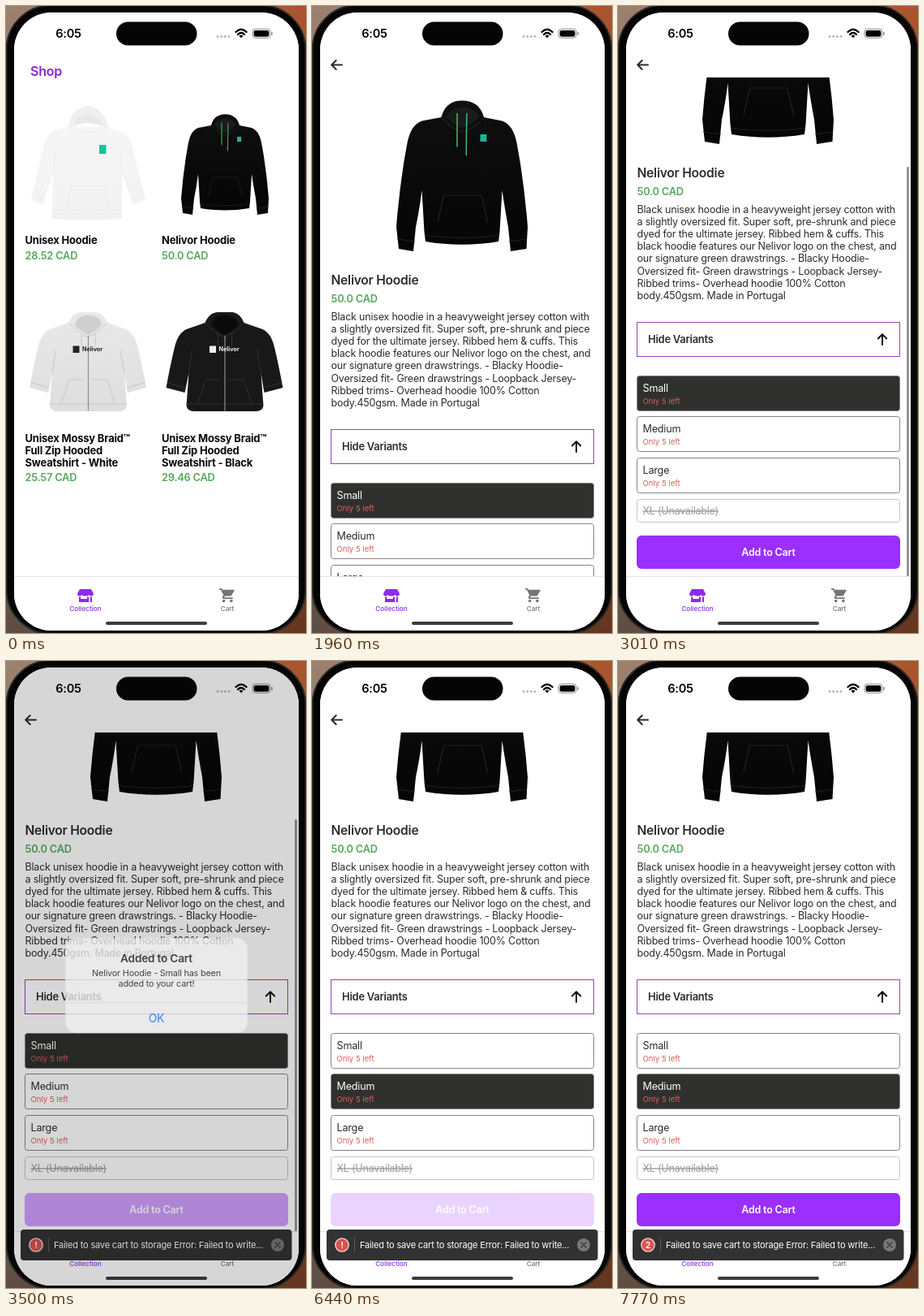
An HTML page for the animation above (8000 ms loop, 370 by 772 pixels).

```html
<!DOCTYPE html>
<html lang="en">
<head>
<meta charset="utf-8">
<title>Shop demo</title>
<style>
  html, body { margin: 0; width: 100%; height: 100%; overflow: hidden; background: #111; }
  svg { display: block; width: 370px; height: 772px; }
  text { font-family: Inter, "Liberation Sans", sans-serif; white-space: pre; }
</style>
</head>
<body>
<svg id="stage" viewBox="0 0 370 772" xmlns="http://www.w3.org/2000/svg"></svg>
<script>
const PURPLE = '#9a2fff', GREEN = '#55a85a', INK = '#2c2c2e';
const BRAND = 'Nelivor';
const LOOP = 8000, MAX_SCROLL = 129;

// Markup helpers
const text = (x, mid, size, str, o = {}) =>
  `<text x="${x}" y="${(mid + size * 0.36).toFixed(2)}" font-size="${size}" font-weight="${o.w || 400}"
    fill="${o.fill || INK}" text-anchor="${o.anchor || 'start'}"
    letter-spacing="${size < 10 ? 0 : -0.016 * size}" ${o.more || ''}>${str}</text>`;
const rect = (x, y, w, h, fill, r = 0, more = '') =>
  `<rect x="${x}" y="${y}" width="${w}" height="${h}" rx="${r}" fill="${fill}" ${more}/>`;
const path = (d, fill = 'none', more = '') => `<path d="${d}" fill="${fill}" ${more}/>`;
const line = (d, color, width = 1, more = '') =>
  path(d, 'none', `stroke="${color}" stroke-width="${width}" stroke-linecap="round" stroke-linejoin="round" ${more}`);
const group = (id, body, more = '') => `<g id="${id}" ${more}>${body}</g>`;

// Garments
const whiteHoodie = () =>
  path('M78 148L58 154Q48 159 44 183L31 238L45 244L58 206L57 262Q100 265 143 262L143 206L157 244L172 238L158 183Q154 160 144 155L125 149Z', 'url(#paleCloth)') +
  path('M77 151Q79 126 101 123Q122 126 126 151Q114 144 101 144Q88 144 77 151Z', '#efefef') +
  path('M84 148Q87 134 101 133Q115 134 119 148Q101 140 84 148Z', '#e8e8e8') +
  line('M77 151Q101 160 126 151M58 206L61 178M143 206L141 178M57 256Q100 258 143 256M74 254L80 222H121L127 254M33 232L47 238M170 232L155 238', '#ececec') +
  rect(115, 171, 8.5, 11, '#17c39a');

const zipHoodie = (cloth, seam, inner, mark) =>
  path('M77 390Q82 378 92 377L111 377Q120 378 125 390L148 398Q159 403 163 422Q168 443 173 470L150 476L146 452L149 492Q148 499 140 499H63Q55 499 54 492L57 452L52 476L29 470Q34 443 39 422Q43 403 54 398Z', cloth) +
  path('M85 393Q87 381 101 380.500Q116 381 118 393Q110 401 101 405Q92 401 85 393Z', inner) +
  line('M77 390Q88 402 101 408Q114 402 125 390M57 452L61 424M146 452L141 424M55 490H148M68 489L78 460H95M134 489L125 460H107M31 464L53 470M171 464L149 470', seam, 0.9) +
  line('M101.500 406V498', '#8d8d8d', 1.2) +
  line('M93 403V419M110 403V419', seam, 1) +
  rect(82.5, 418.5, 8, 8.5, mark) +
  text(94, 422.7, 7.2, BRAND, { w: 700, fill: mark });

const blackHoodie = () =>
  path('M36 14Q39 2 50 .5Q67 -1 71 14L86 17Q95 20 98 35L101 52Q105 78 107 104L106 122L93 124L91 104Q88 88 86 74L84 108L83 116Q53 121 23 116L22 108L20 74Q18 90 15 104L13 124L1 122L-1 104Q1 78 5 52L8 35Q11 20 20 17Z', 'url(#darkCloth)') +
  path('M40 14Q44 6 54 6Q64 6 67 14Q60 20 53 23Q46 20 40 14Z', '#1b1b1b') +
  line('M36 14Q44 23 53 26Q64 23 71 14M33 100L38 78H69L74 100M23 111Q53 115 83 111M0 114L14 116M92 116L106 114', '#212121', 0.8) +
  line('M49 11V38M57 11Q56.500 30 56.500 45', '#43b673', 1) +
  rect(68, 28, 5.2, 6, '#1fb598');

// Screens
const price = (x, y, s) => text(x, y, 12.8, s, { w: 600, fill: GREEN });
const label = (x, y, s) => text(x, y, 13, s, { w: 700, fill: '#0a0a0a' });
const zipInfo = (x, shade, cost) =>
  label(x, 532, 'Unisex Mossy Braid™') + label(x, 547, 'Full Zip Hooded') +
  label(x, 562, 'Sweatshirt - ' + shade) + price(x, 580.5, cost);

const shop = rect(10, 8, 352, 695, '#fff') +
  text(30, 80, 16, 'Shop', { w: 600, fill: '#8427d6' }) +
  whiteHoodie() + label(23.5, 288, 'Unisex Hoodie') + price(23.5, 307, '28.52 CAD') +
  group('tapped',
    `<g transform="translate(217 133)">${blackHoodie()}</g>` +
    label(192, 288, BRAND + ' Hoodie') + price(192, 307, '50.0 CAD')) +
  zipHoodie('url(#greyCloth)', '#c6c6c6', '#cfcfcf', '#222') + zipInfo(23.5, 'White', '25.57 CAD') +
  `<g transform="translate(168.5 0)">${zipHoodie('#181818', '#343434', '#0a0a0a', '#eee')}</g>` +
  zipInfo(192, 'Black', '29.46 CAD');

const about = [
  'Black unisex hoodie in a heavyweight jersey cotton with',
  'a slightly oversized fit. Super soft, pre-shrunk and piece',
  'dyed for the ultimate jersey. Ribbed hem &amp; cuffs. This',
  `black hoodie features our ${BRAND} logo on the chest, and`,
  'our signature green drawstrings. - Blacky Hoodie-',
  'Oversized fit- Green drawstrings - Loopback Jersey-',
  'Ribbed trims- Overhead hoodie 100% Cotton',
  'body.450gsm. Made in Portugal'
];
const arrow = id => line('M326 536.500V549M320.800 541.500L326 536.300L331.200 541.500', '#111', 2, `id="${id}"`);

const option = (name, y) => group('opt' + name,
  rect(23.5, y, 324, 43, '#fff', 3, `id="box${name}" stroke="#858585"`) +
  text(30.5, y + 14.7, 12.6, name, { more: `id="name${name}"` }) +
  text(30.5, y + 31.5, 9.6, 'Only 5 left', { fill: '#d8605a' }));

const product = rect(10, 8, 352, 695, '#fff') +
  `<g clip-path="url(#viewport)">` + group('content',
    `<g transform="translate(105.5 116) scale(1.5)">${blackHoodie()}</g>` +
    text(23.5, 337, 15.6, BRAND + ' Hoodie', { w: 600 }) +
    price(23.5, 360, '50.0 CAD') +
    about.map((s, i) => text(23.5, 382 + i * 15.2, 12.5, s)).join('') +
    rect(23.5, 521.5, 324, 42, '#fff', 0, 'stroke="#9048ba"') +
    text(37, 542.7, 12.9, 'Show Variants', { w: 600, more: 'id="toggle"' }) +
    arrow('chevron') +
    group('options', option('Small', 587.5) + option('Medium', 637.5) + option('Large', 688.5) +
      rect(23.5, 739.5, 324, 28, '#fff', 3, 'stroke="#c4c4c4"') +
      text(30.5, 753.5, 12.5, 'XL (Unavailable)', { fill: '#9a9a9a', more: 'text-decoration="line-through"' })) +
    group('add', rect(23, 583, 325, 41, PURPLE, 6) +
      text(185.5, 603.8, 12.5, 'Add to Cart', { w: 600, fill: '#fff', anchor: 'middle' }))
  ) + '</g>' +
  line('M37 72.500H24.500M29.700 67L24.200 72.500L29.700 78', INK, 2) +
  rect(356.2, 195, 2.6, 507, '#8a8a8a', 1.3, 'id="bar"');

const statusBar =
  text(77, 34, 14.6, '6:05', { w: 600, fill: '#000', anchor: 'middle' }) +
  [261, 265.7, 270.4, 275].map(x => `<circle cx="${x}" cy="37.5" r="1.5" fill="#b9b9b9"/>`).join('') +
  line('M283.500 32Q290 25.500 296.500 32M286 35Q290 31.200 294 35', '#000', 2.4) +
  path('M287.500 36.700Q290 34.600 292.500 36.700L290 39.500Z', '#000') +
  rect(304, 28.3, 22, 11, 'none', 3.5, 'stroke="#8b8b8b"') +
  rect(305.6, 29.9, 18.8, 7.8, '#000', 2.2) + rect(327.2, 32, 1.5, 4, '#8b8b8b', 0.7);

const tabBar = rect(10, 702, 352, 68, '#fff') + rect(10, 702, 352, 1, '#e2e2e2') +
  path('M91 718H105L108 723.500Q108 726.500 105.300 726.500Q103 726.500 102.500 725Q101.500 726.500 98 726.500Q94.500 726.500 93.500 725Q93 726.500 90.700 726.500Q88 726.500 88 723.500Z', '#8d2cec') +
  path('M90 727.500H92.200V730H100V727.500H102.200V734H90ZM103.800 727.500H106V734H103.800Z', '#8d2cec') +
  path('M7 18a2 2 0 1 0 .01 0ZM1 2v2h2l3.600 7.600-1.350 2.450C4.500 15.400 5.500 17 7 17h12v-2H7.420l.8-2h7.450c.75 0 1.410-.41 1.750-1.030L21 5.500A1 1 0 0 0 20 4H5.210l-.94-2ZM17 18a2 2 0 1 0 .01 0Z', '#757575', 'transform="translate(262.2 715.3) scale(.92 .86)"') +
  text(98, 742, 8.2, 'Collection', { w: 500, fill: '#8d2cec', anchor: 'middle' }) +
  text(273, 742, 8.2, 'Cart', { w: 500, fill: '#757575', anchor: 'middle' });

const toast = rect(18, 700, 334.5, 38, '#323232', 4) +
  `<circle cx="37" cy="719" r="8.2" fill="#d9534f" stroke="#f1dada" stroke-width="1.3"/>` +
  text(37, 719, 10.5, '!', { w: 600, fill: '#fff', anchor: 'middle', more: 'id="badge"' }) +
  rect(52, 710, 1, 18, '#5d5d5d') +
  text(59, 719, 11, 'Failed to save cart to storage Error: Failed to write...', { fill: '#fff' }) +
  `<circle cx="335" cy="719" r="8" fill="#777"/>` +
  line('M332 716L338 722M338 716L332 722', '#323232', 1.3);

const centred = (y, size, s, o) => text(185.5, y, size, s, { anchor: 'middle', ...o });
const alertBox = rect(75.5, 342.5, 220, 114, '#f0f0f0', 12, 'fill-opacity=".97"') +
  path('M75.500 420H295.500V444.500Q295.500 456.500 283.500 456.500H87.500Q75.500 456.500 75.500 444.500Z', '#dcdcdc', 'id="okPress"') +
  rect(75.5, 420, 220, 0.7, '#d2d2d2') +
  centred(366.7, 13.4, 'Added to Cart', { w: 600, fill: '#222' }) +
  centred(384.3, 10.6, '', { fill: '#222', more: 'id="message"' }) +
  centred(397.2, 10.6, 'added to your cart!', { fill: '#222' }) +
  centred(439, 13.6, 'OK', { w: 500, fill: '#2f86ee' });

const gradient = (id, a, b, dir = 'x2="0" y2="1"') =>
  `<linearGradient id="${id}" ${dir}><stop stop-color="${a}"/><stop offset="1" stop-color="${b}"/></linearGradient>`;

document.getElementById('stage').innerHTML = `<defs>
    ${gradient('wall', '#9c8170', '#a9552c', 'x2="1" y2="0"')}
    ${gradient('dusk', 'rgba(20,16,14,0)', 'rgba(20,16,14,.45)')}
    ${gradient('paleCloth', '#f6f6f6', '#f1f1f1')}
    ${gradient('greyCloth', '#e9e9e9', '#dedede')}
    ${gradient('darkCloth', '#0f0f0f', '#050505')}
    <clipPath id="screen"><rect x="10" y="8" width="351" height="761" rx="46"/></clipPath>
    <clipPath id="viewport"><rect x="10" y="88" width="352" height="614"/></clipPath>
  </defs>` +
  rect(0, 0, 370, 772, 'url(#wall)') + rect(0, 0, 370, 772, 'url(#dusk)') +
  rect(0.5, -1, 369, 774, '#050505', 55, 'stroke="#2b2826" stroke-width="2"') +
  `<g clip-path="url(#screen)">` +
  rect(10, 8, 352, 762, '#fff') +
  group('shop', shop) + group('product', product) + statusBar + tabBar +
  rect(123, 758, 125, 4, '#3c3c3c', 2) + group('toast', toast) +
  rect(10, 8, 352, 762, '#000', 0, 'id="dim"') + group('alert', alertBox) + '</g>' +
  rect(136, 19.5, 99.5, 29, '#050505', 14.5);

// Motion
const el = {};
document.querySelectorAll('[id]').forEach(n => el[n.id] = n);
const set = (id, name, value) => el[id].setAttribute(name, value);
const show = (id, on) => set(id, 'visibility', on ? 'inherit' : 'hidden');
const fade = (id, v) => { set(id, 'opacity', v); show(id, v > 0.002); };
const clamp = v => Math.min(1, Math.max(0, v));
const ease = v => (v = clamp(v), v < 0.5 ? 2 * v * v : 1 - 2 * (1 - v) ** 2);
// Remaining distance of a critically damped spring, 1 down to 0
const spring = (ms, w) => { const k = Math.max(0, ms) / 1000 * w; return (1 + k) * Math.exp(-k); };
const track = (t, steps) => {
  const i = steps.findIndex(s => s[0] > t);
  if (i === 0) return steps[0][1];
  if (i < 0) return steps[steps.length - 1][1];
  const [a, u] = steps[i - 1], [b, v] = steps[i];
  return u + (v - u) * (t - a) / (b - a);
};
const touch = (t, press, release) =>
  t < press ? 1 : 0.2 + 0.8 * ease((t - release) / 250);

const PRESSES = [3290, 6440];
const PULL = [[2320, 0], [2380, 55], [2450, 145], [2520, 197], [2540, 199]];
// Whole pixels keep the box edges crisp
const scrollAt = t => Math.round(t < 2540 ? track(t, PULL) : MAX_SCROLL + 70 * spring(t - 2540, 10.5));

function render(t) {
  set('tapped', 'opacity', track(t, [[690, 1], [800, 0.4]]));
  const x = 351 * spring(t - 785, 18.26);
  set('product', 'transform', `translate(${Math.round(x)} 0)`);
  show('product', t > 785);
  set('shop', 'transform', `translate(${-0.3 * (351 - x)} 0)`);
  show('shop', t < 1400);

  const open = t >= 1960;
  el.toggle.textContent = (open ? 'Hide' : 'Show') + ' Variants';
  set('chevron', 'transform', open ? '' : 'rotate(180 326 542.7)');
  show('options', open);
  set('add', 'transform', `translate(0 ${open ? 201 : 0})`);

  const y = scrollAt(t), over = Math.max(0, y - MAX_SCROLL);
  set('content', 'transform', `translate(0 ${-y})`);
  set('bar', 'y', 88 + Math.min(y, MAX_SCROLL) * 107 / MAX_SCROLL + over);
  set('bar', 'height', 507 - over);
  fade('bar', track(t, [[2330, 0], [2380, 1], [3520, 1], [3740, 0]]));

  const chosen = t < 5180 ? 'Small' : 'Medium';
  for (const name of ['Small', 'Medium', 'Large']) {
    set('box' + name, 'fill', name === chosen ? '#30302f' : '#fff');
    set('name' + name, 'fill', name === chosen ? '#fff' : INK);
  }
  set('optMedium', 'opacity', touch(t, 5110, 5200));

  const second = t >= PRESSES[1], press = PRESSES[+second], dt = t - press;
  set('add', 'opacity', touch(dt, 0, 110));
  const grow = 1 - spring(dt - 100, 27);
  const shown = grow * (1 - ease((dt - 1010) / 310));
  const scale = 1.1 - 0.1 * grow;
  fade('dim', 0.2 * shown);
  fade('alert', shown);
  set('alert', 'transform', `translate(185.5 399.5) scale(${scale}) translate(-185.5 -399.5)`);
  show('okPress', shown > 0.002 && dt >= 910);
  el.message.textContent = `${BRAND} Hoodie - ${second ? 'Medium' : 'Small'} has been`;

  show('toast', t >= 3430);
  el.badge.textContent = t >= 6580 ? '2' : '!';
}

const start = performance.now();
function tick() {
  render((performance.now() - start) % LOOP);
  requestAnimationFrame(tick);
}
tick();
</script>
</body>
</html>
```
